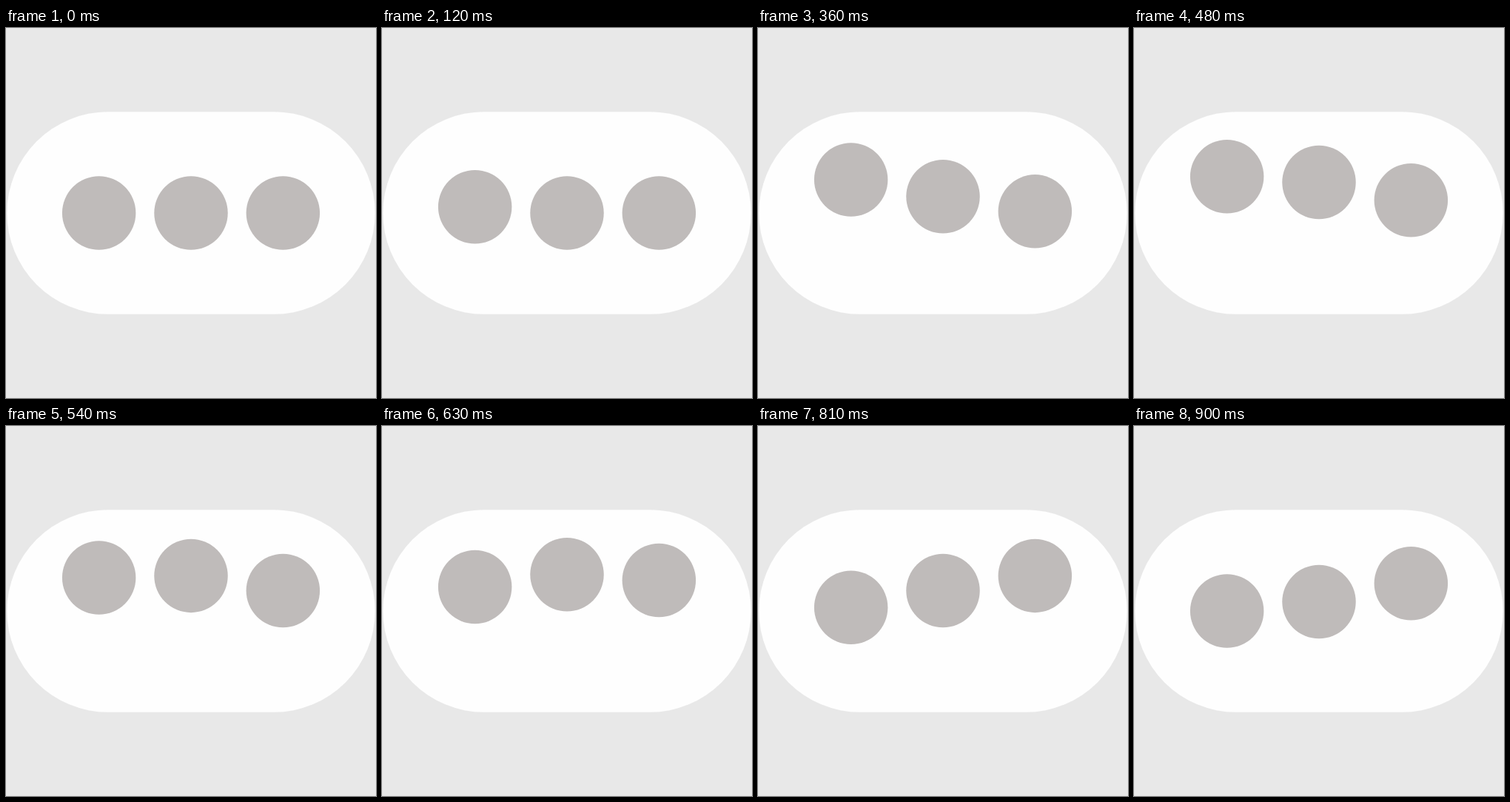
These frames come from a looping animation (500 by 500 pixels, 0.93 s). An HTML page with a canvas:

```html
<!DOCTYPE html>
<html lang="en">
<head>
<meta charset="utf-8">
<title>Typing indicator</title>
<style>
  html, body { margin: 0; width: 100%; height: 100%; overflow: hidden; background: #e8e8e8; }
  canvas { display: block; width: 500px; height: 500px; }
</style>
</head>
<body>
<canvas id="stage" width="500" height="500"></canvas>
<script>
const ctx = document.getElementById('stage').getContext('2d');
const SIZE = 500, MID = SIZE / 2, UNIT = 24.87;
const LOOP = 930, STEP = 30;
const HOP = 900, STAGGER = 150;

// Height of one smooth hop that rises and falls over HOP ms.
function lift(ms) {
  if (ms <= 0 || ms >= HOP) return 0;
  return UNIT * (1 - Math.cos(2 * Math.PI * ms / HOP));
}

function drawBubble() {
  const w = 20 * UNIT, h = 11 * UNIT;
  ctx.fillStyle = '#fefefe';
  ctx.beginPath();
  ctx.roundRect(MID - w / 2, MID - h / 2, w, h, h / 2);
  ctx.fill();
}

function drawDot(index, ms) {
  const x = MID + (index - 1) * 5 * UNIT;
  const y = MID - lift(ms - index * STAGGER);
  ctx.fillStyle = '#bfbbba';
  ctx.beginPath();
  ctx.arc(x, y, 2 * UNIT, 0, 2 * Math.PI);
  ctx.fill();
}

function render() {
  const ms = Math.floor((performance.now() % LOOP) / STEP) * STEP;
  ctx.fillStyle = '#e8e8e8';
  ctx.fillRect(0, 0, SIZE, SIZE);
  drawBubble();
  for (let i = 0; i < 3; i++) drawDot(i, ms);
  requestAnimationFrame(render);
}

render();
</script>
</body>
</html>
```
